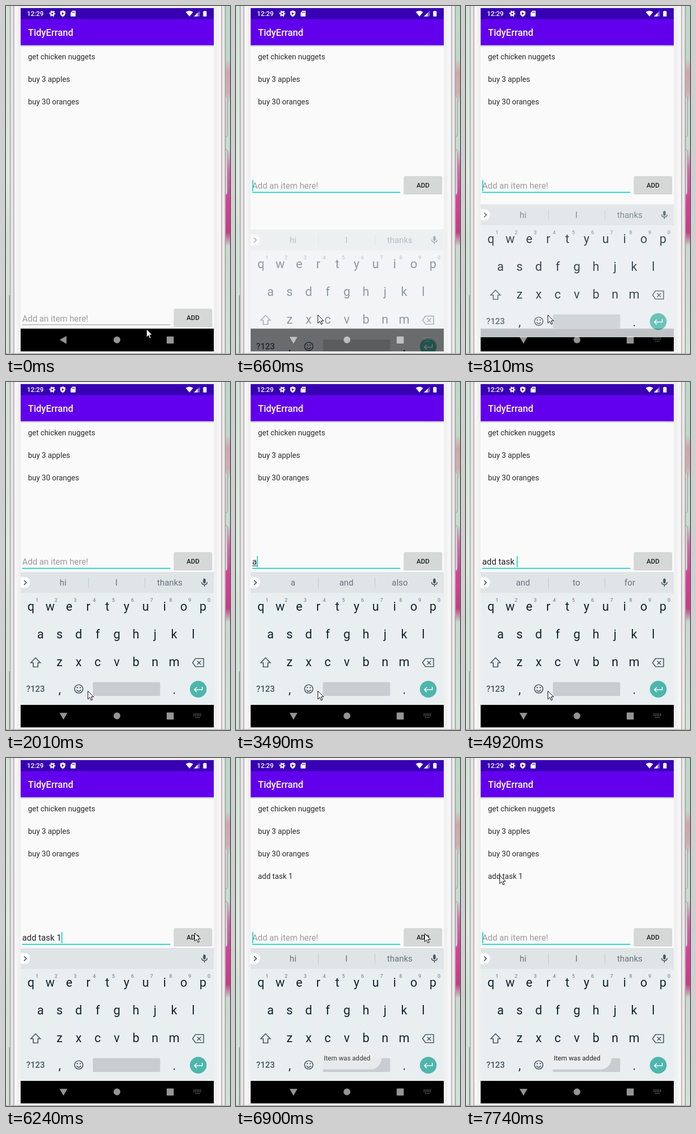
An HTML page that plays this animation: 428 px wide and 665 px high, repeating every 8 s.

```html
<!DOCTYPE html>
<html lang="en">
<head>
<meta charset="utf-8">
<title>To-do list</title>
<style>
  html, body { margin: 0; width: 100%; height: 100%; overflow: hidden; background: #f0f0f0; }
  svg { display: block; width: 428px; height: 665px; }
  text { font-family: Roboto, "Noto Sans", sans-serif; white-space: pre; }
  .mid { text-anchor: middle; }
  .item { font-size: 14.37px; fill: #2b2b2b; }
  .field { font-size: 16.16px; }
  .key { font-size: 23.4px; fill: #12242d; text-anchor: middle; }
  .num { font-size: 9.6px; fill: #66737a; text-anchor: middle; }
  .tip { font-size: 16.16px; fill: #68757b; text-anchor: middle; }
  .line { fill: none; stroke: #46555d; stroke-width: 1.7; }
</style>
</head>
<body>
<svg viewBox="0 0 428 665">
  <defs>
    <linearGradient id="wallL" x2="0" y2="1">
      <stop offset="0" stop-color="#cfe3d6"/><stop offset=".3" stop-color="#d8e8dd"/>
      <stop offset=".5" stop-color="#dfebe2"/><stop offset=".65" stop-color="#cfe2d6"/>
      <stop offset="1" stop-color="#d2e4d9"/>
    </linearGradient>
    <linearGradient id="wallR" x2="0" y2="1">
      <stop offset="0" stop-color="#b9dac8"/><stop offset=".15" stop-color="#bfd9c9"/>
      <stop offset=".19" stop-color="#cfa6ac"/><stop offset=".25" stop-color="#cdb0b2"/>
      <stop offset=".28" stop-color="#c3dccf"/><stop offset=".41" stop-color="#c6dccf"/>
      <stop offset=".47" stop-color="#dd66b0"/><stop offset=".55" stop-color="#d8409a"/>
      <stop offset=".65" stop-color="#c93a86"/><stop offset=".69" stop-color="#c8d9cf"/>
      <stop offset="1" stop-color="#cfe3d7"/>
    </linearGradient>
    <linearGradient id="shade" x2="0" y2="1">
      <stop offset="0" stop-color="#000" stop-opacity=".2"/><stop offset="1" stop-color="#000" stop-opacity="0"/>
    </linearGradient>
    <clipPath id="screen"><path d="M28 4H397V660H28Z"/></clipPath>
    <clipPath id="btnClip"><rect x="321" y="578.5" width="72.5" height="33.5" rx="2"/></clipPath>
  </defs>

  <!-- phone body -->
  <path d="M0 0H428V665H0Z" fill="#f0f0f0"/>
  <path d="M0 0H7V665H0Z" fill="url(#wallL)"/>
  <path d="M420 0H428V665H420Z" fill="url(#wallR)"/>
  <path d="M7 0H9V665H7Z" fill="#b3b1b2"/>
  <path d="M9 0H14V665H9Z" fill="#e6e4e5"/>
  <path d="M14 0H16V665H14Z" fill="#bdb4b7"/>
  <path d="M16 0H22V665H16ZM404 0H411V665H404Z" fill="#f6f6f6"/>
  <path d="M411 0H413V665H411Z" fill="#bdb4b7"/>
  <path d="M413 0H418V665H413Z" fill="#ebe9ea"/>
  <path d="M418 0H420V665H418Z" fill="#a9a7a8"/>
  <path d="M6.5 553V665" stroke="#777" fill="none"/>
  <path d="M420 171q3 2 3 6V246q0 3-3 4M420 274q3 1 3 5V356q0 4-3 5" fill="#dcdada" stroke="#8e8e8e"/>
  <path d="M0 663.5H428V665H0Z" fill="#b4b4b4"/>

  <g clip-path="url(#screen)">
    <path d="M28 4H397V660H28Z" fill="#fafafa"/>
    <path d="M28 75H397V79H28Z" fill="url(#shade)"/>
    <path d="M28 25H397V75H28Z" fill="#6200ee"/>
    <path d="M28 4H397V25H28Z" fill="#3700b3"/>
    <text x="42" y="56.6" font-size="17.96" font-weight="500" fill="#fff">TidyErrand</text>
    <text x="40" y="19" font-size="12.57" font-weight="500" fill="#fff">12:29</text>

    <g fill="#fff">
      <circle cx="88.5" cy="14.5" r="3" fill="none" stroke="#fff" stroke-width="2.6"/>
      <circle cx="88.5" cy="14.5" r="5" fill="none" stroke="#fff" stroke-width="1.7" stroke-dasharray="2.7 2.536" stroke-dashoffset="1.35"/>
      <path fill-rule="evenodd" d="M108.5 8.5L113.5 10.5V14Q113.3 18.5 108.5 20.5Q103.7 18.5 103.5 14V10.5ZM106.7 11.8V17L111 14.4Z"/>
      <path fill-rule="evenodd" d="M127 9H132Q133 9 133 10V19Q133 20 132 20H124.500Q123.500 20 123.500 19V12.500ZM126.700 11V13.200H127.700V11ZM128.600 11V13.200H129.600V11ZM130.500 11V13.200H131.500V11Z"/>
      <path d="M343.500 11.500Q350.500 6.500 357.500 11.500L350.500 20Z"/>
      <path d="M370 9V20H359Z" opacity=".4"/><path d="M366 13V20H359Z"/>
      <path d="M379 9H381V10H383.300V20H376.700V10H379Z"/>
    </g>

    <g id="list"></g>

    <g id="entry">
      <text id="value" class="field" x="31" y="602.6"></text>
      <rect id="wordLine" y="604.300" height="1" fill="#222"/>
      <rect id="base" x="31" width="283"/>
      <rect id="caret" y="586" width="1.800" height="21.500" fill="#0fd5c6"/>
      <rect x="320.500" y="579.500" width="73.500" height="34" rx="2.500" fill="#000" opacity=".16"/>
      <rect x="321" y="578.500" width="72.500" height="33.500" rx="2" fill="#d6d7d7"/>
      <circle id="ripple" cx="360" cy="590" fill="#000" clip-path="url(#btnClip)"/>
      <text class="mid" x="357.300" y="600.200" font-size="12.570" font-weight="500" fill="#222">ADD</text>
    </g>

    <path d="M28 616.500H397V660H28Z"/>

    <g id="board">
      <path d="M28 363H397V617H28Z" fill="#e9eef1"/>
      <path d="M28 363H397V403H28Z" fill="#dfe4e7"/>
      <path d="M28 372.500H35.500A10.500 10.500 0 0 1 35.500 393.500H28Z" fill="#fcfdfd"/>
      <path class="line" d="M34.500 379L39 383.300L34.500 387.600"/>
      <path id="bars" d="M157.500 373V394M265.500 373V394" stroke="#c1c8cc" fill="none"/>
      <g id="tips"></g>
      <rect x="376.700" y="375.500" width="4.800" height="9.500" rx="2.400" fill="#46555d"/>
      <path class="line" stroke-width="1.400" d="M373.800 382.500Q374 387.400 379.100 387.400Q384.200 387.400 384.400 382.500M379.100 387.400V391"/>
      <g id="keys"></g>
      <path class="line" d="M56.500 527L65.500 536.500H61V544.500H52V536.500H47.500Z"/>
      <path class="line" d="M362 528.500H377.500V544H362L356.500 536.300ZM365.300 533L372.300 540M372.300 533L365.300 540"/>
      <text class="mid" x="56.500" y="592.300" font-size="16.160" font-weight="500" fill="#46555d">?123</text>
      <text class="key" x="102.500" y="595.500">,</text>
      <text class="key" x="321.500" y="595.500">.</text>
      <circle class="line" cx="139" cy="586.500" r="8"/>
      <path class="line" stroke-width="1.500" d="M134.700 588.300Q139 593.800 143.300 588.300"/>
      <circle cx="136.200" cy="584" r="1.300" fill="#46555d"/><circle cx="141.800" cy="584" r="1.300" fill="#46555d"/>
      <rect x="166" y="573.500" width="128.500" height="26.500" rx="2" fill="#c7cdd0"/>
      <circle cx="367.300" cy="587" r="16" fill="#4db6ac"/>
      <path class="line" style="stroke:#fff" d="M375 582.500V588H360M364.500 583.500L360 588L364.500 592.500"/>
    </g>

    <g fill="#fff" opacity=".58">
      <path id="back" d="M102.500 638L115.500 630.500V645.500Z"/>
      <circle cx="212" cy="638" r="6.500"/>
      <rect x="307" y="631.500" width="13.500" height="13.500" rx="1"/>
      <path id="dots" d="M358.500 634.500H372.500M358.500 637.500H372.500M361.500 641H369.500" fill="none" stroke="#fff" stroke-width="1.600" stroke-dasharray="1.600 1.500"/>
    </g>

    <g id="toast">
      <rect x="147.500" y="553" width="130.500" height="42" rx="21" fill="#ebeeef"/>
      <text class="mid" x="212.300" y="578.300" font-size="12.570" fill="#262626">Item was added</text>
    </g>
  </g>

  <path id="mouse" d="M.5 .5V16L4.200 12.600L6.700 18.300L9.200 17.200L6.700 11.700H11.500Z" fill="#fff" stroke="#000"/>
</svg>

<script>
const LOOP = 8000;
const $ = id => document.getElementById(id);
const set = (id, attrs) => { for (const k in attrs) $(id).setAttribute(k, attrs[k]); };

function label(parent, cls, x, y, str = '') {
  const el = document.createElementNS('http://www.w3.org/2000/svg', 'text');
  el.setAttribute('class', cls);
  el.setAttribute('x', x);
  el.setAttribute('y', y);
  el.textContent = str;
  return $(parent).appendChild(el);
}

// Each track is a list of [start time, ...values]; a value holds until the next start.
const mouse = [[0, 268, 617], [150, 204, 603], [270, 156, 590], [5730, 194, 546], [5850, 278, 440],
  [5970, 343, 363], [6090, 364, 347], [6240, 360, 334], [6360, 360, 335], [7170, 139, 264],
  [7320, 92, 240], [7440, 70, 227], [7590, 65, 224], [7740, 64, 224]];
const board = [[0, 0, 253], [540, .12, 115], [660, .45, 64], [810, .82, 16], [930, 1, 0]];
const back = [[0, 0], [540, -45], [660, -90]];
const raised = [[0, 0], [540, 253.4]];
const focus = [[0, 0], [420, 1]];
const caret = [[0, 0], [420, 1], [1080, 0], [1510, 1], [2010, 0], [2470, 1], [2940, 0], [3490, 1],
  [5730, 0], [6240, 1], [7170, 0], [7590, 1]];
const typed = [[0, ''], [3490, 'a'], [3740, 'ad'], [4010, 'add'], [4130, 'add '], [4250, 'add t'],
  [4370, 'add ta'], [4490, 'add tas'], [4640, 'add task'], [4920, 'add task '], [5200, 'add task 1'], [6630, '']];
const tips = [[0, 'hi I thanks'], [3490, 'a and also'], [3860, 'ad and add'], [4010, 'add and adds'],
  [4130, 'to a the'], [4250, 't the to'], [4370, 'ta take talk'], [4490, 'tas task tasks'],
  [4640, 'task tasks ask'], [4920, 'and to for'], [5200, ''], [6630, 'hi I thanks']];
const ripple = [[0, 0, 0], [6510, 22, .1], [6630, 45, .12], [6750, 60, .06], [6900, 0, 0]];
const toast = [[0, 0], [6630, .25], [6750, .6], [6900, .88], [7170, 1]];
const added = [[0, 0], [6630, 1]];

const at = (track, t) => track.findLast(s => s[0] <= t).slice(1);

const items = ['get chicken nuggets', 'buy 3 apples', 'buy 30 oranges', 'add task 1']
  .map((s, i) => label('list', 'item', 42, 101.9 + 43.1 * i, s));
const tipEls = [109, 211, 313].map(x => label('tips', 'tip', x, 389.3));
[['qwertyuiop', 47.7], ['asdfghjkl', 65.8], ['zxcvbnm', 102.2]].forEach(([row, x0], r) =>
  [...row].forEach((c, i) => {
    const x = x0 + 36.5 * i;
    label('keys', 'key', x, 436.5 + 53.1 * r, c);
    if (!r) label('keys', 'num', x + 11.4, 419.5, (i + 1) % 10);
  }));

function showEntry(t) {
  const [text] = at(typed, t), [on] = at(focus, t);
  const value = $('value');
  value.textContent = text || 'Add an item here!';
  value.setAttribute('fill', text ? '#222' : '#9b9b9b');
  const width = text ? value.getComputedTextLength() : 0;
  const word = text.match(/[a-z]*$/)[0];
  const wordW = word ? value.getSubStringLength(text.length - word.length, word.length) : 0;
  set('wordLine', { x: 31 + width - wordW, width: wordW });
  set('caret', { x: 31.2 + width, opacity: at(caret, t)[0] });
  set('base', on ? { y: 608.6, height: 1.8, fill: '#0fd5c6' } : { y: 608.6, height: 1, fill: '#8c8c8c' });
  set('entry', { transform: `translate(0 ${-at(raised, t)[0]})` });
  const [r, dark] = at(ripple, t);
  set('ripple', { r, opacity: dark });
}

function draw(t) {
  showEntry(t);
  const [alpha, drop] = at(board, t);
  set('board', { opacity: alpha, transform: `translate(0 ${drop})` });
  set('dots', { opacity: alpha });
  set('back', { transform: `rotate(${at(back, t)[0]} 109.8 638)` });
  const words = at(tips, t)[0].split(' ');
  tipEls.forEach((el, i) => el.textContent = words[i] || '');
  set('bars', { opacity: words[0] ? 1 : 0 });
  items[3].setAttribute('opacity', at(added, t)[0]);
  set('toast', { opacity: at(toast, t)[0] });
  set('mouse', { transform: `translate(${at(mouse, t).join(' ')})` });
}

const start = performance.now();
function tick() {
  draw((performance.now() - start) % LOOP);
  requestAnimationFrame(tick);
}
tick();
</script>
</body>
</html>
```
